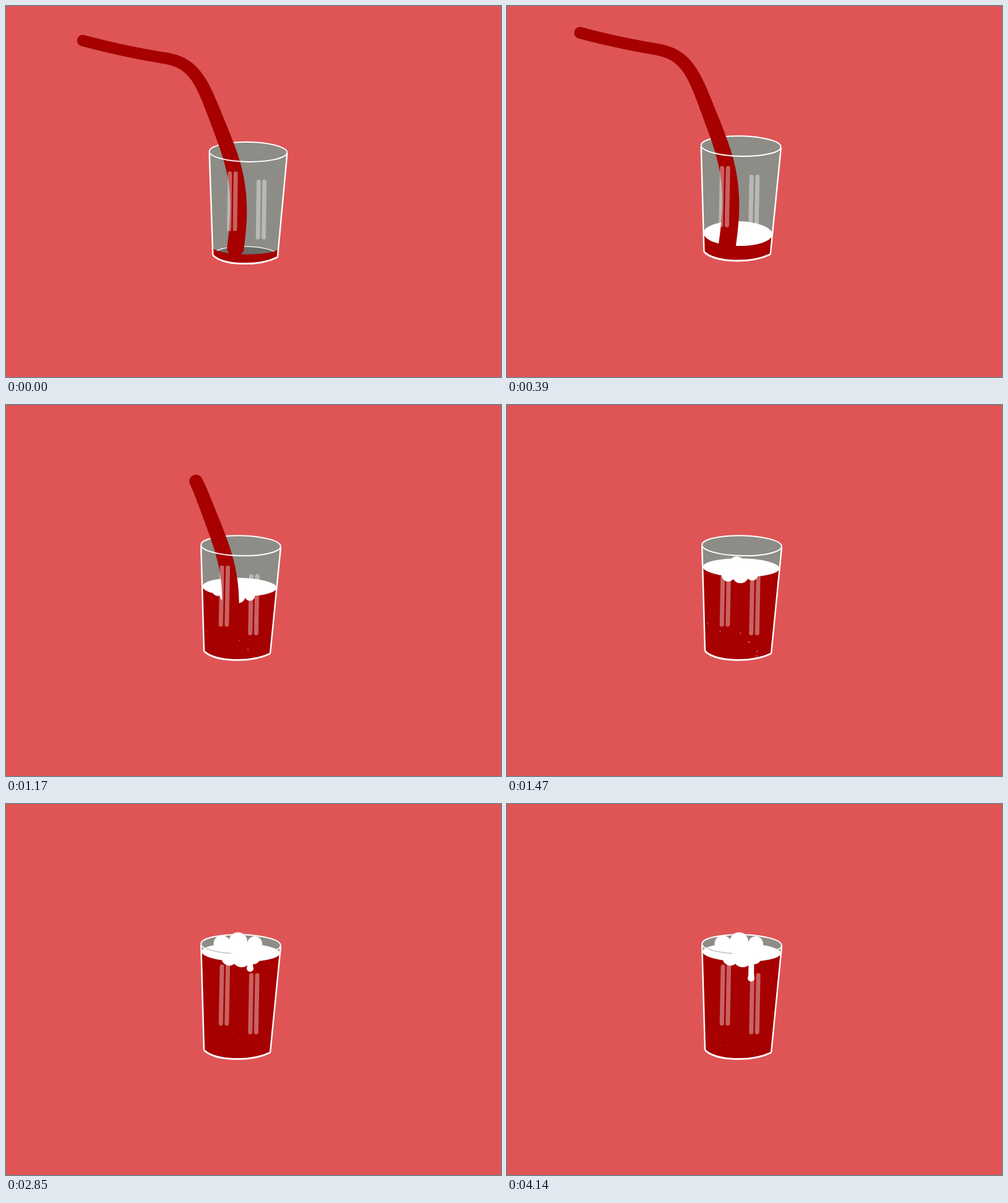
An HTML page with a canvas that plays this animation: 800x600 px, repeating every 4.17 s.

```html
<!DOCTYPE html>
<html lang="en">
<head>
<meta charset="utf-8">
<title>Filling glass</title>
<style>
  html, body { margin: 0; width: 100%; height: 100%; overflow: hidden; background: #df5556; }
  canvas { display: block; }
</style>
</head>
<body>
<canvas id="stage" width="800" height="600"></canvas>
<script>
const ctx = document.getElementById('stage').getContext('2d');
const LOOP = 4170, STEP = 30;
const BG = '#df5556', GREY = '#8d8c86', DARK = '#6b6a66', RED = '#a60000', WHITE = '#fff';

const mix = (a, b, u) => a + (b - a) * u;
const smooth = u => u * u * (3 - 2 * u);
// Progress from 0 to 1 between two times.
const part = (t, from, to) => Math.max(0, Math.min(1, (t - from) / (to - from)));

// Value at time t between [time, value] keys.
function at(t, keys, ease = u => u) {
  let value = keys[0][1];
  for (let i = 1; i < keys.length; i++)
    value = mix(value, keys[i][1], ease(part(t, keys[i - 1][0], keys[i][0])));
  return value;
}

const sway = t => at(t, [[0, 1], [120, 1.88], [390, -.11], [690, 0]], smooth);
const level = t => at(t, [[0, 386], [390, 368.6], [870, 326], [1470, 263], [1950, 240]]);
const depth = t => at(t, [[0, 11], [390, 20], [870, 15]]);
const drained = t => 13 * part(t, 0, 390) + 487 * part(t, 390, 1570) ** 2;

// The stream is a chain of cubic curves that widens on its way down.
const CURVES = [
  [[107, 41.5], [150, 53], [192, 63], [246.5, 72]],
  [[246.5, 72], [296, 82], [306, 118], [332.5, 186]],
  [[332.5, 186], [358, 252], [371, 292], [357.5, 386]]
];
function cubic([a, b, c, d], u) {
  const v = 1 - u;
  return [0, 1].map(i =>
    v * v * v * a[i] + 3 * v * v * u * b[i] + 3 * v * u * u * c[i] + u * u * u * d[i]);
}
const stream = [];
let run = 0;
for (const curve of CURVES)
  for (let u = 0; u < 1; u += 1 / 160) {
    const [x, y] = cubic(curve, u), last = stream[stream.length - 1];
    if (last) run += Math.hypot(x - last.x, y - last.y);
    stream.push({ x, y, run, r: 9.5 + 4.5 * part(run, 130, 450) });
  }

// Foam bumps: final x, offset from the foam level, radius, time of rest.
const BUMPS = [
  [349, -14, 13.5, 2850], [375, -17.5, 15, 2100], [402, -14, 12, 2850],
  [361, 9, 12.5, 2100], [381, 8, 16, 2100], [400, 8, 11, 2100]
];

let seed = 7;
const random = () => (seed = seed * 16807 % 2147483647) / 2147483647;
const bubbles = Array.from({ length: 8 }, () =>
  ({ x: 324 + 98 * random(), phase: random(), r: 1 + .8 * random() }));

function fill(color, draw) {
  ctx.beginPath();
  draw();
  ctx.fillStyle = color;
  ctx.fill();
}
function stroke(color, width, draw) {
  ctx.beginPath();
  draw();
  ctx.strokeStyle = color;
  ctx.lineWidth = width;
  ctx.stroke();
}
function disc(x, y, r) {
  ctx.moveTo(x + r, y);
  ctx.arc(x, y, r, 0, 7);
}
function line(x1, y1, x2, y2) {
  ctx.moveTo(x1, y1);
  ctx.lineTo(x2, y2);
}
const rim = (from, to) => ctx.ellipse(379.5, 227.5, 64.3, 16.3, .02, from, to);
const base = () => ctx.bezierCurveTo(396, 417, 338, 416, 320, 398);

function drawGlass() {
  fill(GREY, () => {
    rim(Math.PI, 0);
    ctx.lineTo(427, 402);
    base();
  });
  stroke(WHITE, 2, () => rim(Math.PI, 2 * Math.PI));
  const floor = () => ctx.ellipse(374, 398, 53, 14, .02, Math.PI, 2 * Math.PI);
  fill(DARK, floor);
  stroke(WHITE, 1.2, floor);
}

function drawLiquid(t) {
  const y = level(t), ry = depth(t);
  const left = 316 + (y - 230) * .0235, right = 443.6 - (y - 230) * .097;
  const x = (left + right) / 2, rx = (right - left) / 2;
  fill(RED, () => {
    ctx.ellipse(x, y, rx, ry, .02, Math.PI, 0, true);
    ctx.lineTo(427, 402);
    base();
  });

  for (const b of bubbles) {
    const rise = (b.phase + t / 1650) % 1;
    ctx.globalAlpha = .35 * part(t, 800, 1400) * mix(1, .25, part(t, 1470, 2400)) * (1 - rise / 2);
    fill(WHITE, () => disc(b.x, 407 - 66 * rise, b.r));
  }
  ctx.globalAlpha = 1;

  const grow = part(t, 0, 300);
  fill(WHITE, () => {
    ctx.ellipse(x, y, rx * grow, ry * grow, .02, 0, 7);
    for (const [bx, dy, r, rest] of BUMPS) {
      const rise = smooth(part(t, 870, rest));
      const start = dy < 0 ? 6 : 15;
      disc(bx - 7 * (1 - rise), y + mix(start, dy, rise), r * part(t, 500, 870) * mix(.7, 1, rise));
    }
  });
}

function drawStream(t) {
  const gone = drained(t);
  fill(RED, () => {
    for (const p of stream) if (p.run >= gone) disc(p.x, p.y, p.r);
  });
}

function drawOutline() {
  stroke(WHITE, 2.4, () => {
    line(315.2, 228, 320, 398);
    line(444, 230, 427, 402);
  });
  stroke(WHITE, 2.8, () => {
    ctx.moveTo(427, 402);
    base();
  });
  stroke(WHITE, 2, () => rim(0, Math.PI));
}

function drawDrip(t) {
  const y = mix(250, 281.5, part(t, 1950, 3750));
  fill(WHITE, () => disc(394.5, y, 5.5));
  stroke(WHITE, 9, () => line(395, 250, 394.5, y));
}

function draw(t) {
  ctx.setTransform(1, 0, 0, 1, 0, 0);
  ctx.fillStyle = BG;
  ctx.fillRect(0, 0, 800, 600);

  const k = sway(t), scale = 1 - .023 * k;
  ctx.translate(375 + 12.6 * k, 320 + 6.4 * k);
  ctx.rotate(-.006 * k);
  ctx.scale(scale, scale);
  ctx.translate(-375, -320);
  ctx.lineCap = 'butt';

  drawGlass();
  drawLiquid(t);
  drawStream(t);
  drawOutline();
  if (t > 1800) {
    stroke(GREY, .8, () => {
      ctx.moveTo(324, 234);
      ctx.quadraticCurveTo(341, 240.5, 364, 241.5);
    });
  }
  if (t > 1950) drawDrip(t);

  ctx.lineCap = 'round';
  for (const [x, y] of [[349, 263], [396.5, 277]])
    for (const dx of [0, 9.6])
      stroke('rgba(255,255,255,.38)', 7, () => line(x + dx, y, x + dx - 1.8, y + 92));
}

function frame(now) {
  draw(Math.floor(now % LOOP / STEP) * STEP);
  requestAnimationFrame(frame);
}
draw(0);
requestAnimationFrame(frame);
</script>
</body>
</html>
```
